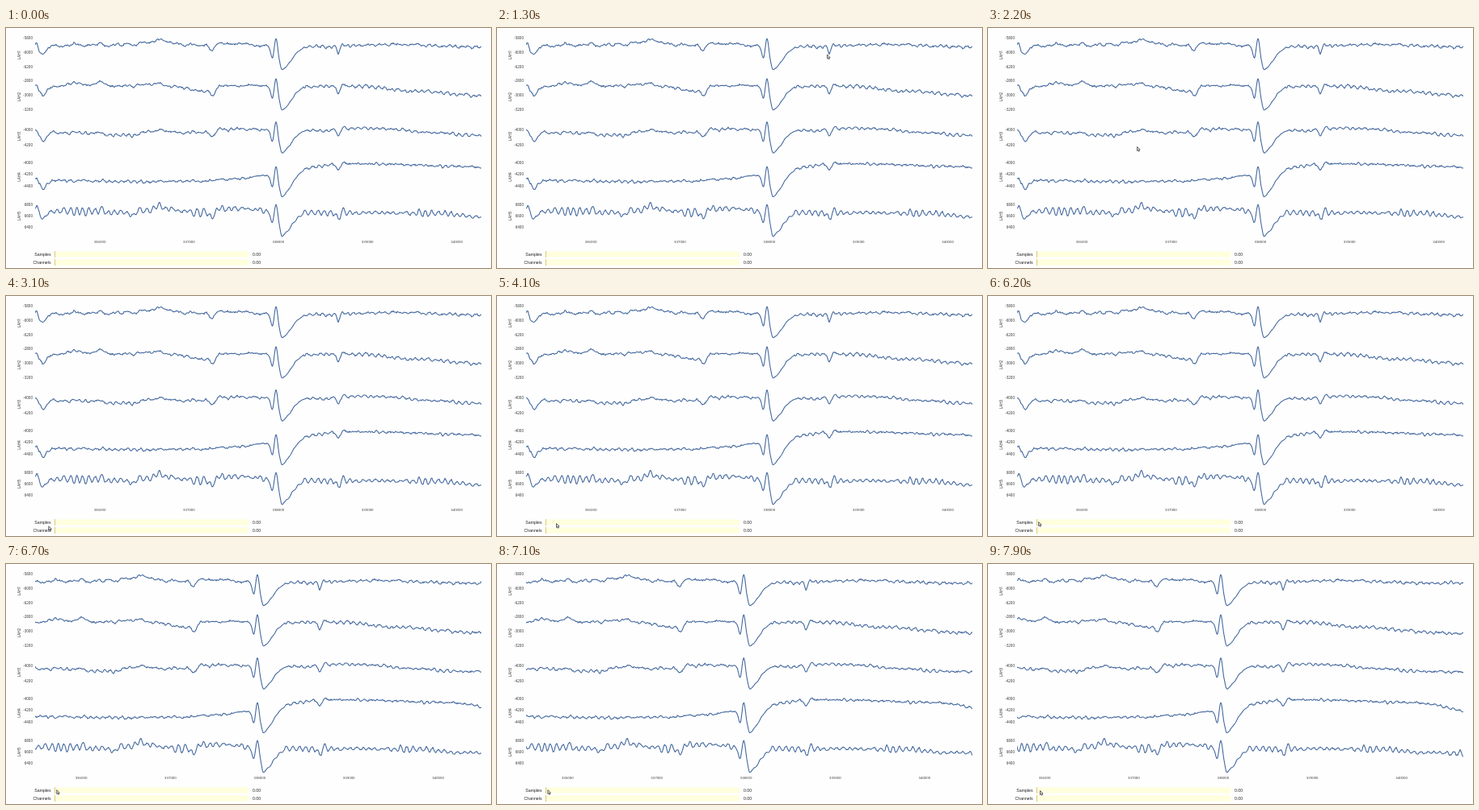
Recreate the animation shown at these times as an HTML page with a canvas. Size 600x298 px, loop 8000 ms.

```html
<!DOCTYPE html>
<html lang="en">
<head>
<meta charset="utf-8">
<title>Signal viewer</title>
<style>
html, body { margin: 0; width: 100%; height: 100%; overflow: hidden; background: #fefefe; }
canvas { display: block; width: 600px; height: 298px; }
</style>
</head>
<body>
<canvas id="stage"></canvas>
<script>
const W = 600, H = 298, LOOP = 8000;
const LEFT = 36, RIGHT = 588, END = 640, STEP = 5.75;
const canvas = document.getElementById('stage');
const ctx = canvas.getContext('2d');
const dpr = window.devicePixelRatio || 1;
canvas.width = W * dpr;
canvas.height = H * dpr;

// Sharp deflections seen on every channel: [x, dy]
const spikes = [
  [36, -3], [38, -4], [41, 4], [46, 9], [52, 3], [58, 0],
  [322, 0], [326, 4], [329.5, 15], [334, -9], [338, 16], [341.5, 29.5],
  [345, 27], [351, 20], [357, 11], [363, 5], [372, 0],
  [407, 0], [411, 8], [417, -3], [423, 0]];

// Softer humps, scaled per channel: [x, width, height]
const humps = [
  [117, 4, -4], [157, 4, 3], [190, 5, -2], [218, 4, 2], [255, 4, 8], [266, 5, -3]];

// drift: baseline every 50 px; ripple: amplitude before and after the big spike
const channels = [
  { name: 'LAH1', mid: 33.5, first: -5800, ticks: [12, 30, 48], gain: 1, wander: 1.8, ripple: [0.6, 1.3],
    drift: [23, 20, 21, 16, 21, 20, 22, 23, 21, 20, 22, 23, 23] },
  { name: 'LAH2', mid: 85.5, first: -2800, ticks: [65, 83, 101], gain: 1, wander: 1.8, ripple: [0.6, 1.5],
    drift: [74, 69, 72, 69, 77, 71, 72, 72, 72, 77, 80, 84, 86] },
  { name: 'LAH3', mid: 134.5, first: -4000, ticks: [126, 145], gain: 0.8, wander: 1.4, ripple: [1.2, 1.5],
    drift: [130, 129, 133, 127, 129, 125, 125, 127, 124, 126, 130, 133, 133] },
  { name: 'LAH4', mid: 185, first: -4000, ticks: [167, 181, 196], gain: 0.1, wander: 0.6, ripple: [1.3, 1.4],
    drift: [189, 189, 190, 190, 189, 186, 180, 171, 168, 169, 171, 173, 182] },
  { name: 'LAH5', mid: 233.5, first: 6800, ticks: [219, 233, 247], gain: 1.1, wander: 2, ripple: [4.5, 3.2],
    drift: [226, 228, 229, 223, 228, 224, 228, 229, 229, 229, 230, 234, 234] }
];

// Pointer keyframes: [ms, x, y]
const cursorPath = [
  [1200, 463, 24], [1400, 353, 41], [1700, 353, 41], [2200, 184, 147], [2600, 89, 254],
  [2900, 49, 286], [3000, 49, 286], [3700, 72, 281], [3900, 75, 282], [4100, 73, 282],
  [4700, 63, 281], [5000, 61, 280], [6000, 61, 280], [6100, 62, 280], [7500, 62.5, 280],
  [7900, 64, 281], [LOOP, 64, 281]];
const scrollTimes = [6300, 6300, 6400, 6500, 7000, 7600, 7700, 7900];

// Hermite curve through sorted [x, y] points
function curve(pts, x) {
  const last = pts.length - 1;
  if (x <= pts[0][0]) return pts[0][1];
  if (x >= pts[last][0]) return pts[last][1];
  const i = pts.findIndex(p => p[0] > x);
  const [a, b] = [pts[i - 1], pts[i]];
  const slope = k => {
    const p = pts[Math.max(0, k - 1)], q = pts[Math.min(last, k + 1)];
    const peak = (pts[k][1] - p[1]) * (q[1] - pts[k][1]) <= 0;
    return peak ? 0 : (q[1] - p[1]) / (q[0] - p[0]);
  };
  const w = b[0] - a[0], u = (x - a[0]) / w, v = 1 - u;
  return a[1] * v * v * (1 + 2 * u) + b[1] * u * u * (3 - 2 * u) +
    w * u * v * (slope(i - 1) * v - slope(i) * u);
}

function hash(i, seed) {
  const s = Math.sin(i * 127.1 + seed * 311.7) * 43758.5453;
  return (s - Math.floor(s)) * 2 - 1;
}

function noise(x, seed) {
  const i = Math.floor(x), u = x - i;
  return hash(i, seed) * (1 - u) + hash(i + 1, seed) * u;
}

function signal(ch, k, x) {
  const inSpike = x > 322 && x < 368;
  const calm = inSpike ? 0.3 : 1;
  const drift = curve(ch.drift.map((y, i) => [40 + i * 50, y]), x);
  const hump = humps.reduce((sum, [c, w, h]) => sum + h * Math.exp(-(((x - c) / w) ** 2)), 0);
  const swell = 0.65 + 0.5 * noise(x / 17, k + 20);
  const ripple = ch.ripple[x < 345 ? 0 : 1] * swell * Math.sin(x * 0.8 + k + noise(x / 16, k + 40));
  const wander = ch.wander * (x < 345 ? 1 : 0.5) * noise(x / 6, k + 60);
  const rough = 0.85 * noise(x, k + 1) + 0.8 * noise(x / 2.4, k + 9);
  return drift + curve(spikes, x) + ch.gain * hump + calm * (ripple + wander + rough) + 0.5;
}

// Every trace is sampled once and then only shifted
const traces = channels.map((ch, k) => {
  const path = new Path2D();
  for (let x = LEFT; x <= END; x += 0.5) path.lineTo(x, signal(ch, k, x));
  return path;
});

function text(str, x, y, size, align, family = '"Open Sans", sans-serif') {
  ctx.font = size + 'px ' + family;
  ctx.textAlign = align;
  ctx.textBaseline = 'middle';
  ctx.fillText(str, x, y);
}

function drawAxes(shift) {
  ctx.fillStyle = '#2c2c2c';
  for (const ch of channels) {
    ch.ticks.forEach((y, i) => text(String(ch.first - i * 200), 33, y + 1, 4.5, 'right'));
    ctx.save();
    ctx.translate(17, ch.mid);
    ctx.rotate(-Math.PI / 2);
    text(ch.name, 0, 0, 4.7, 'center');
    ctx.restore();
  }
  for (let i = 0; i < 5; i++) {
    text(String(336000 + i * 1000), 116 + i * 110.4 - shift, 266, 4.3, 'center');
  }
}

function drawTraces(shift) {
  ctx.save();
  ctx.beginPath();
  ctx.rect(LEFT, 0, RIGHT - LEFT, 262);
  ctx.clip();
  ctx.translate(-shift, 0);
  ctx.strokeStyle = '#45699f';
  ctx.lineWidth = 1.1;
  ctx.lineJoin = 'round';
  traces.forEach(path => ctx.stroke(path));
  ctx.restore();
}

function drawSlider(label, y) {
  const family = '"Liberation Sans", Arial, sans-serif';
  ctx.fillStyle = '#ffffde';
  ctx.fillRect(60, y - 3.5, 240, 7);
  ctx.fillStyle = '#dcc878';
  ctx.fillRect(60, y - 4, 1, 8);
  ctx.fillStyle = '#222';
  text(label, 55.5, y + 0.2, 5.2, 'right', family);
  text('0.00', 305, y + 0.2, 5.2, 'left', family);
}

function drawCursor(t) {
  if (t < cursorPath[0][0]) return;
  const i = cursorPath.findIndex(p => p[0] > t);
  const [t0, x0, y0] = cursorPath[i - 1], [t1, x1, y1] = cursorPath[i];
  const u = (t - t0) / (t1 - t0);
  ctx.save();
  ctx.translate(x0 + (x1 - x0) * u + 0.5, y0 + (y1 - y0) * u + 0.5);
  ctx.beginPath();
  ctx.moveTo(0, 0);
  ctx.lineTo(0, 5);
  ctx.lineTo(1.2, 4);
  ctx.lineTo(2, 5.8);
  ctx.lineTo(2.8, 5.4);
  ctx.lineTo(2.1, 3.7);
  ctx.lineTo(3.6, 3.6);
  ctx.closePath();
  ctx.fillStyle = '#e8e8e8';
  ctx.fill();
  ctx.strokeStyle = '#333';
  ctx.lineWidth = 0.75;
  ctx.stroke();
  ctx.restore();
}

function draw(time) {
  const t = Math.floor((time % LOOP) / 100) * 100;
  const shift = STEP * scrollTimes.filter(s => s <= t).length;
  ctx.setTransform(dpr, 0, 0, dpr, 0, 0);
  ctx.fillStyle = '#fefefe';
  ctx.fillRect(0, 0, W, H);
  drawAxes(shift);
  drawTraces(shift);
  drawSlider('Samples', 281);
  drawSlider('Channels', 291);
  drawCursor(t);
}

const start = performance.now();
function loop() {
  draw(performance.now() - start);
  requestAnimationFrame(loop);
}
loop();
</script>
</body>
</html>
```
